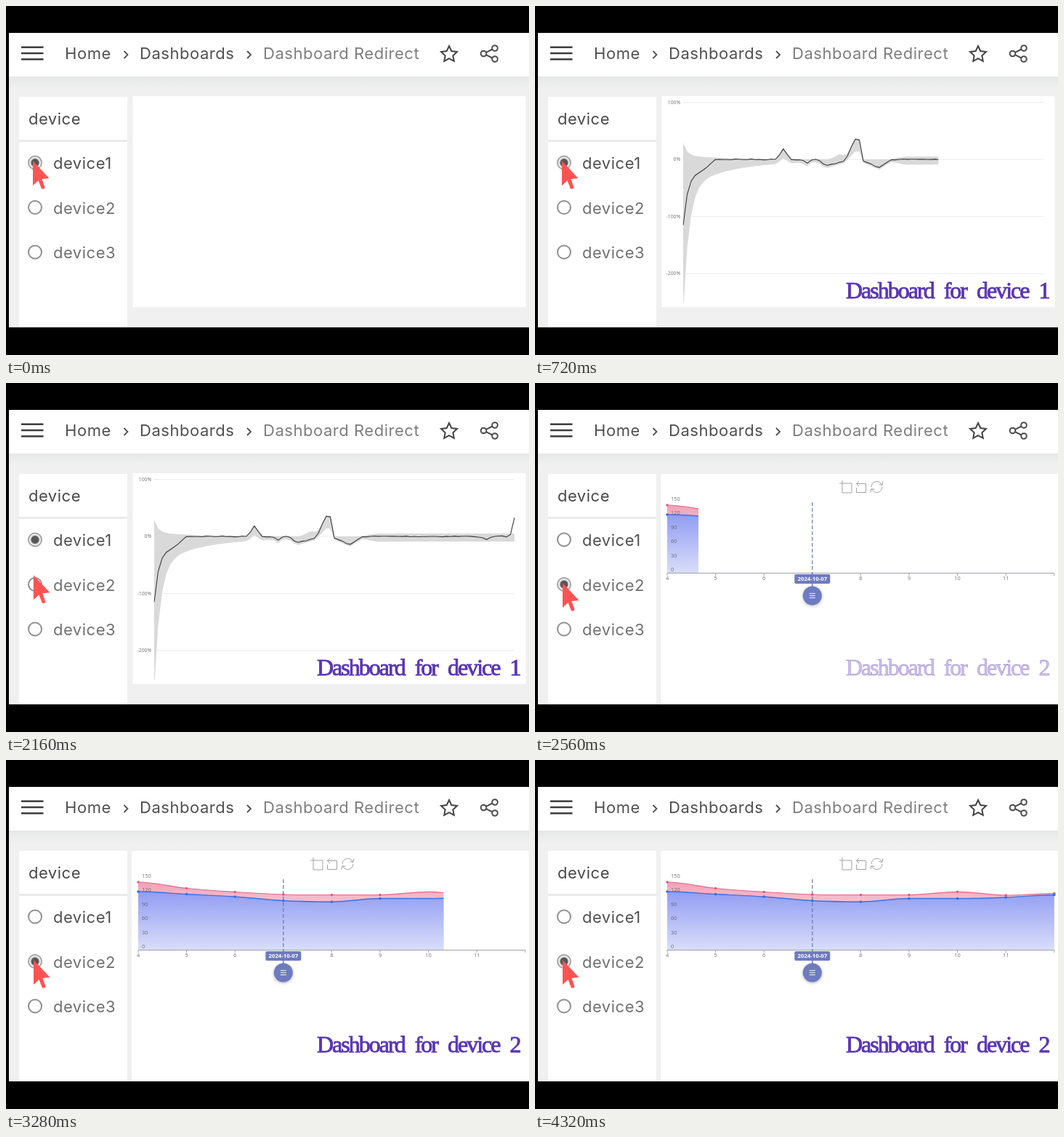
Animation of 720x480 px, one loop 4960 ms. Source, as an HTML page with a canvas:

```html
<!DOCTYPE html>
<html lang="en">
<head>
<meta charset="utf-8">
<title>Dashboard Redirect</title>
<style>
  html, body { margin: 0; width: 100%; height: 100%; overflow: hidden; background: #000; }
  canvas { display: block; }
</style>
</head>
<body>
<canvas id="stage" width="720" height="480"></canvas>
<script>
const ctx = document.getElementById('stage').getContext('2d');
const LOOP = 4960, STEP = 80;
const UI = '22px Inter, "Open Sans", sans-serif';
const SMALL = '"Open Sans", "Noto Sans", sans-serif';
const SERIF = '32px "Liberation Serif", "Noto Serif", serif';

const clamp = v => Math.min(1, Math.max(0, v));
const mix = (a, b, u) => a + (b - a) * u;

function rect(x, y, w, h, color) {
  ctx.fillStyle = color;
  ctx.fillRect(x, y, w, h);
}

function text(str, x, y, font, color, align = 'left', spacing = 0) {
  ctx.font = font;
  ctx.fillStyle = color;
  ctx.textAlign = align;
  ctx.letterSpacing = spacing + 'px';
  ctx.fillText(str, x, y);
}

function trace(pts) {
  pts.forEach(([x, y], i) => i ? ctx.lineTo(x, y) : ctx.moveTo(x, y));
}

function stroke(color, width) {
  ctx.strokeStyle = color;
  ctx.lineWidth = width;
  ctx.stroke();
}

function fill(color) {
  ctx.fillStyle = color;
  ctx.fill();
}

function line(pts, color, width) {
  ctx.beginPath();
  trace(pts);
  stroke(color, width);
}

function circle(x, y, r) {
  ctx.beginPath();
  ctx.arc(x, y, r, 0, Math.PI * 2);
}

function disc(x, y, r, color) {
  circle(x, y, r);
  fill(color);
}

function ring(x, y, r, color, width) {
  circle(x, y, r);
  stroke(color, width);
}

function clipTo(x, y, w, h) {
  ctx.beginPath();
  ctx.rect(x, y, w, h);
  ctx.clip();
}

function fade(y0, y1, from, to) {
  const g = ctx.createLinearGradient(0, y0, 0, y1);
  g.addColorStop(0, from);
  g.addColorStop(1, to);
  return g;
}

// ---------- page ----------

function star(cx, cy) {
  ctx.beginPath();
  for (let i = 0; i < 10; i++) {
    const r = i % 2 ? 5.6 : 11.5, a = (i / 5 - 0.5) * Math.PI;
    ctx.lineTo(cx + r * Math.cos(a), cy + r * Math.sin(a));
  }
  ctx.closePath();
  stroke('#444', 2);
}

function share(x, y) {
  ring(x, y, 3.8, '#4c4c4c', 2);
  for (const s of [-1, 1]) {
    line([[x + 3.5, y + 1.6 * s], [x + 12, y + 6 * s]], '#4c4c4c', 2);
    ring(x + 15.5, y + 7.5 * s, 3.8, '#4c4c4c', 2);
  }
}

function header() {
  rect(4, 37, 716, 60, '#fff');
  for (let i = -1; i < 2; i++) line([[21, 65 + 8.3 * i], [51.5, 65 + 8.3 * i]], '#3c3c3c', 2.5);
  text('Home', 81, 73, UI, '#505050', 'left', 0.6);
  text('Dashboards', 184, 73, UI, '#505050', 'left', 0.53);
  text('Dashboard Redirect', 354, 73, UI, '#7e7e7e', 'left', 0.53);
  for (const x of [162.5, 332]) line([[x, 62], [x + 5, 67], [x, 72]], '#505050', 1.8);
  star(610, 66.5);
  share(657.5, 65.5);
}

function sidebar(selected) {
  rect(18, 125, 149, 317, '#fff');
  rect(18, 184, 149, 3, '#ebebeb');
  text('device', 31, 163, UI, '#484848', 'left', 0.5);
  for (let n = 1; n <= 3; n++) {
    const y = 154 + 61.5 * n, on = n === selected;
    ring(40, y, 9, on ? '#a2a2a2' : '#8f8f8f', 2);
    if (on) {
      disc(40, y, 7, '#d0d0d0');
      disc(40, y, 5.4, '#575757');
    }
    text('device' + n, 65, y + 8.5, UI, n > 1 ? '#707070' : '#4f4f4f', 'left', 0.5);
  }
}

function page(selected) {
  rect(0, 0, 720, 480, '#000');
  rect(4, 37, 716, 405, '#f0f0f0');
  rect(4, 97, 716, 16, fade(97, 113, '#e6e7e7', '#f0f0f0'));
  header();
  sidebar(selected);
}

function cursor(x, y) {
  const tip = [[0, 0], [0, 34], [7.5, 27], [12, 38.5], [15.5, 38.5], [16.5, 36.5], [12.5, 25], [22.5, 24]];
  ctx.beginPath();
  trace(tip.map(([dx, dy]) => [x + dx, y + dy]));
  fill('#ff5353');
}

function caption(n, alpha) {
  const ink = '#5a36b4';
  ctx.save();
  ctx.globalAlpha = clamp(alpha);
  ctx.strokeStyle = ink;
  ctx.lineWidth = 0.9;
  ctx.wordSpacing = '8px';
  const label = 'Dashboard for device ' + n;
  text(label, 428, 402, SERIF, ink, 'left', -2);
  ctx.strokeText(label, 428, 402);
  ctx.restore();
}

// ---------- percentage chart ----------

const X0 = 204, X1 = 700, ZERO = 211, COUNT = 90;
const xs = Array.from({ length: COUNT + 1 }, (_, i) => mix(X0, X1, i / COUNT));

// Triangular bump: peak at c, reaching zero l before and r after it
const tent = (x, c, l, r, h) => h * clamp(1 - (x < c ? (c - x) / l : (x - c) / r));

const swing = x =>
  tent(x, 342, 10, 10, -15) + tent(x, 375, 8, 6, 5.5) + tent(x, 400, 11, 34, 9) +
  tent(x, 441, 14, 5.5, -27.5) + tent(x, 446.5, 5.5, 5.5, -27) + tent(x, 474, 27, 17, 11.5);

let seed = 7;
function noise() {
  seed = seed * 16807 % 2147483647;
  return seed / 2147483647 - 0.5;
}

const trend = xs.map(x => {
  const d = x - X0;
  const start = 66 * Math.exp(-d / 5.5) + 25 * Math.sqrt(clamp(1 - d / 40));
  const end = tent(x, 661, 12, 12, 4) + tent(x, X1, 6, 1, -26);
  return [x, ZERO + start + swing(x) + end + 1.4 * noise()];
});

const late = x => clamp((x - 485) / 25);

const upper = xs.map(x => {
  const d = x - X0;
  const spread = 17 * Math.exp(-d / 5) + 6 * Math.exp(-d / 50) + 4 * late(x) + tent(x, 421, 16, 16, 8);
  return [x, ZERO + Math.min(0, swing(x)) - spread];
});

const lower = xs.map(x => {
  const d = x - X0, s = swing(x);
  const spread = 170 * Math.exp(-d / 8) + 38 * Math.exp(-d / 60) + 2 + 5 * late(x);
  return [x, ZERO + Math.max(s, s / 2) + spread];
});

function percentChart(p) {
  for (let v = 100; v >= -200; v -= 100) {
    const y = ZERO - v * 0.785;
    line([[X0, y], [X1, y]], '#ebebf1', 1);
    text(v + '%', 200, y + 2, '6.8px ' + SMALL, '#6b6b6b', 'right');
  }
  ctx.save();
  clipTo(X0 - 0.5, 124, (X1 - X0 + 1) * p, 284);
  ctx.beginPath();
  trace([...upper, ...lower.slice().reverse()]);
  fill('#d9d9d9');
  line(trend, '#38383c', 1.1);
  ctx.restore();
}

// ---------- stacked area chart ----------

const LEFT = 182, BASE = 261.5, GAP = 66.6, DAYS = 8;
const blue = [181, 184.5, 188, 193.5, 195, 190.5, 190.5, 189, 185.5];
const pink = [168, 176.5, 181.5, 185, 185.5, 185.5, 181.3, 186, 183.5];
const dayX = i => LEFT + GAP * i;

function slope(ys, i) {
  const a = ys[i] - (ys[i - 1] ?? ys[i]), b = (ys[i + 1] ?? ys[i]) - ys[i];
  return a * b <= 0 ? 0 : (a + b) / 2;
}

function smooth(ys) {
  ctx.beginPath();
  ctx.moveTo(LEFT, ys[0]);
  for (let i = 1; i <= DAYS; i++) {
    const x = dayX(i);
    ctx.bezierCurveTo(x - GAP * 2 / 3, ys[i - 1] + slope(ys, i - 1) / 3,
      x - GAP / 3, ys[i] - slope(ys, i) / 3, x, ys[i]);
  }
}

function area(ys, paint) {
  smooth(ys);
  ctx.lineTo(dayX(DAYS), BASE);
  ctx.lineTo(LEFT, BASE);
  fill(paint);
}

function toolbox() {
  const c = '#a2a2a2';
  line([[423, 134], [423, 151], [436, 151], [436, 138], [419, 138]], c, 1);
  line([[446, 135], [442.5, 138.5], [446, 142]], c, 1);
  line([[442.5, 138.5], [455.5, 138.5], [455.5, 150.5], [442.5, 150.5], [442.5, 144]], c, 1);
  for (const s of [-1, 1]) {
    const turn = s < 0 ? Math.PI : 0;
    ctx.beginPath();
    ctx.arc(470.5, 143, 7.5, turn, turn + 2.75);
    stroke(c, 1);
    line([[470.5 - 8.5 * s, 143 + 7.5 * s], [470.5 - 7.5 * s, 143 + 2.5 * s], [470.5 - 3 * s, 143 + 3.5 * s]], c, 1);
  }
}

function pointer(x) {
  const c = '#6e7bbf';
  ctx.setLineDash([5, 3]);
  line([[x, 164], [x, 263]], '#6a74ac', 1.2);
  ctx.setLineDash([]);
  line([[x, 276], [x, 281]], c, 1.5);
  ctx.beginPath();
  ctx.roundRect(x - 24.5, 263, 49, 13, 2);
  fill(c);
  text('2024-10-07', x, 272.3, 'bold 7.8px ' + SMALL, '#fff', 'center');
  ctx.save();
  ctx.shadowColor = 'rgba(0,0,0,.3)';
  ctx.shadowBlur = 4;
  ctx.shadowOffsetY = 1;
  disc(x, 292.5, 13, c);
  ctx.restore();
  for (let i = -1; i < 2; i++) line([[x - 4, 292.5 + 3 * i], [x + 4, 292.5 + 3 * i]], '#dfe3f4', 1.2);
}

function areaChart(p, dots) {
  toolbox();
  ctx.save();
  clipTo(LEFT - 1, 125, 1 + (DAYS * GAP + 1) * p, 138);
  area(pink, fade(168, 205, '#f2a0b5', '#f9ccd7'));
  area(blue, fade(181, BASE, '#929df3', '#d9def9'));
  smooth(pink);
  stroke('#e4668a', 1.2);
  smooth(blue);
  stroke('#3a72e2', 1.4);
  ctx.restore();

  line([[LEFT, BASE], [dayX(DAYS), BASE]], '#a0a2a8', 1);
  for (let i = 0; i <= DAYS; i++) {
    const x = dayX(i);
    if (dots >= i / DAYS) {
      disc(x, pink[i], 1.8, '#e2587f');
      disc(x, blue[i], 1.8, '#316ee0');
    }
    line([[x, BASE], [x, BASE + 3.5]], '#a0a2a8', 1);
    if (i < DAYS) text(4 + i, x, 271, '7.4px ' + SMALL, '#6e7079', 'center');
  }
  for (let v = 0; v <= 150; v += 30) {
    text(v, 187, 259 - v * 0.65, '7.4px ' + SMALL, 'rgba(95,97,110,.9)');
  }
  pointer(dayX(3));
}

// ---------- timeline ----------

const FIRST = 12, SECOND = 2456, PICK = 2400;

function sweep(t) {
  const u = clamp((t - SECOND) / 1000);
  return u * (0.75 + 0.25 * u);
}

function draw(t) {
  page(t < PICK ? 1 : 2);
  if (t < SECOND) {
    rect(174.5, 124, 541, 290, '#fff');
    if (t > FIRST) {
      percentChart(clamp((t - FIRST) / 1000));
      caption(1, (t - FIRST) / 340);
    }
  } else {
    rect(173, 125, 547, 317, '#fff');
    areaChart(sweep(t), sweep(t - 100));
    caption(2, (t - SECOND) / 340);
  }
  const move = clamp((t - 1000) / (PICK - 1000));
  cursor(mix(37, 38, move), mix(213, 275, move));
}

function frame() {
  const t = performance.now() % LOOP;
  draw(Math.floor(t / STEP) * STEP);
  requestAnimationFrame(frame);
}
frame();
</script>
</body>
</html>
```
